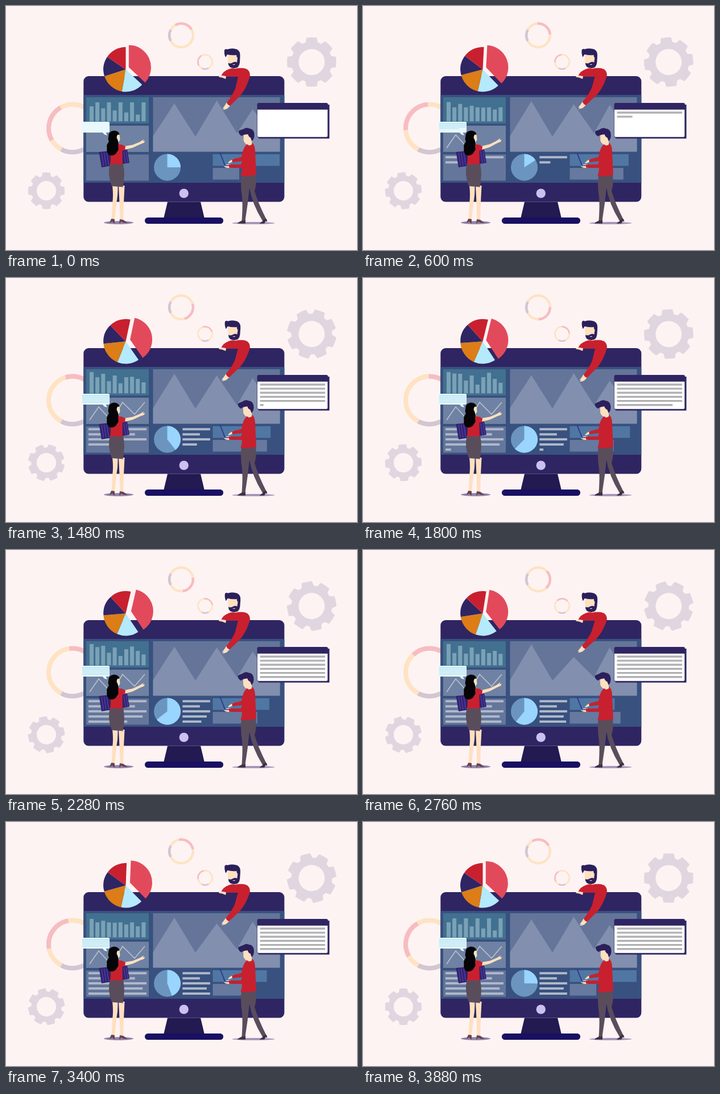
These frames come from a looping animation (617x428 px, 3920 ms). An HTML page:

```html
<!DOCTYPE html>
<html lang="en">
<head>
<meta charset="utf-8">
<title>Dashboard team</title>
<style>
html, body { margin: 0; width: 100%; height: 100%; overflow: hidden; background: #fdf3f3; }
svg { display: block; width: 617px; height: 428px; }
.navy { fill: #2f2562; }
.hair { fill: #2b205b; }
.red { fill: #c8202f; }
.skin { fill: #fee0c0; }
.slate { fill: #594d5c; }
.shoe { fill: #3c3040; }
.rule { fill: none; stroke: #b0b7c9; stroke-width: 4; }
</style>
</head>
<body>
<svg viewBox="0 0 617 428">
  <g id="rings" fill="none"></g>
  <g id="gears" fill="#e0d6e0" stroke="#e0d6e0"></g>

  <!-- monitor -->
  <rect class="navy" x="136.3" y="123" width="353" height="220.6" rx="9"/>
  <rect x="136.3" y="156" width="353" height="154" fill="#38517f"/>
  <circle cx="312.7" cy="328.6" r="8.2" fill="#cbc0ef"/>
  <path d="M284 343.6H342L349 373H277Z" fill="#221a50"/>
  <rect x="244" y="371" width="138" height="11" rx="5.5" fill="#191062"/>

  <!-- dashboard panels -->
  <rect x="141" y="160" width="110" height="46" fill="#427090"/>
  <path id="bars" fill="#7aa1b6"/>
  <rect x="141" y="210" width="110" height="46" fill="#7082a3"/>
  <path id="trend" fill="none" stroke="#b8c0d0" stroke-width="1.7"/>
  <rect x="141" y="260.5" width="110" height="46" fill="#64769b"/>
  <path id="notes" class="rule"/>
  <rect x="258.5" y="160" width="223" height="95.5" fill="#647599"/>
  <path id="peaks" fill="#828fae"/>
  <circle cx="283.5" cy="283" r="23.5" fill="#6b95be"/>
  <path id="share" fill="#99d5ff"/>
  <path id="legend" class="rule"/>
  <rect id="barA" x="363.5" y="260" height="20.5" fill="#5077a3"/>
  <rect id="barB" x="363.5" y="284" height="20.5" fill="#67799f"/>

  <!-- pop-up window -->
  <path class="navy" d="M446 173H568.5V232.5H444Z"/>
  <rect class="navy" x="441.5" y="170" width="124.5" height="61" rx="3"/>
  <path d="M442 181.8H565.3V228Q565.3 229.8 563.3 229.8H444Q442 229.8 442 228Z" fill="#fff"/>
  <path id="text" fill="none" stroke="#b1b1b3" stroke-width="3.4"/>

  <g id="pie"></g>

  <!-- man above the monitor -->
  <g id="headTop">
    <path class="skin" d="M397 100H409V113Q403 115 396 111Z"/>
    <path class="skin" d="M389 83H409V99Q408 106 400 107Q391 106 390 98Z"/>
    <path class="hair" d="M384 77Q386 74.5 389 76Q398 73 406 76Q412 79 411.5 88L411 99Q410 109 401 109Q391 109 390.5 100Q395 102 399 99Q403 97 406 99L407 91Q405 89 405 86Q396 87 389 85L386 90Q383 84 384 77Z"/>
    <path class="skin" d="M398 102.8Q401 101.5 403 102.4Q401 104 398 102.8Z"/>
  </g>
  <path class="red" d="M378 123Q382 114 391 111Q397 108 403 110Q416 107 424 111Q430 116 428.500 124H387Z"/>
  <path class="skin" d="M374 123.5Q380 120.5 387 123.5L386 128Q381 125 374 124.5Z"/>
  <g id="armTop">
    <path class="skin" d="M388 169L394 175L389 180Q385 182 381 182L384 179L380.5 180L385 174Z"/>
    <path class="red" d="M409 120Q418 110 427 116Q430 121 427 129Q421 147 411 158L394 175Q390 174 388 169.5Q398 157 403 145Z"/>
  </g>

  <!-- woman -->
  <ellipse cx="198" cy="380" rx="26" ry="2.8" fill="#9083a9"/>
  <path class="skin" d="M187 315H196.5Q197 332 194 346L191 376H185.5L187 346Q189 332 187 315ZM198 315H208.5L207 345L206 377H200.5L199.5 346Z"/>
  <path d="M185.5 373L191 374V381H189L187 378L182 380.5Q183 376 185.5 373ZM200 374L206 375L214 380.5H207L202 378L201 381H199Z" fill="#67444e"/>
  <path d="M163.5 256L213 251.5L217 275L168 283Z" fill="#2f226a"/>
  <path d="M168 257.5L171.5 280M172.5 257L176 280M177 257L180.5 279M207 255L210 275M211 254L214 274" stroke="#4d3aa0" stroke-width="1.7"/>
  <path class="slate" d="M182.5 277H206Q210 294 205.5 317.5L186 316Q178 296 182.5 277Z"/>
  <path id="armLeft" class="skin" d="M206 246.5L223 243.5L235 238.5L242.5 234L240.5 237.5L244 236.5L243 240L236 242.5L223 248.5L207 252.5Z"/>
  <path class="red" d="M183 248Q194 241 205 243.5L210 246.5L209 253L204.5 254L205 278H183Q185 264 183 248Z"/>
  <path class="skin" d="M193 225H199.5L200.5 234Q199 239 196 239V245H191Z"/>
  <path d="M180 230Q180 219 190 218.5Q199 219 199.5 226Q195 224 194.5 231Q199 238 197 247Q199 252 195 256Q192 263 183 262Q176 259 177.5 249Q176 243 181 238Q179 235 180 230Z" fill="#050407"/>

  <!-- speech bubble -->
  <path d="M133 203H180Q182 203 182 205V220Q182 222 180 222H175.5L178 227Q172 226 170 222H133Z" fill="#e8f8fd"/>
  <path id="speech" fill="none" stroke="#a6dfee" stroke-width="1.2"/>

  <!-- man with the laptop -->
  <ellipse cx="435" cy="380.8" rx="37.5" ry="2" fill="#a095b8"/>
  <path class="shoe" d="M415 375H421V381.5H407Q408 379 414 377ZM451 374L457 372.5L459 376V379L457 377L454 381.5H446Q447 379 451 378Z"/>
  <path class="slate" d="M414 295H439Q441 311 437 325Q443 345 457 373L450.5 376Q433 348 428 319Q425 348 420.5 376.5H414.5Q417 341 413.5 325Q412 310 414 295Z"/>
  <path class="skin" d="M400 267.5L398 273.5Q393 276 389.5 276L393 272ZM395 277.5V283.5Q387 285 383 281L387 278Z"/>
  <path d="M376.500 258L385 280H399" fill="none" stroke="#29308c" stroke-width="1.6"/>
  <path class="red" d="M423 243Q429 239 434 241Q438 246 438 256L439 278L440 296Q426 300 412.5 298Q415 290 415 284L392 283.5V278L413 278L415 272L398 274L397 269L414 265Q416 250 423 243Z"/>
  <g id="headRight">
    <path class="skin" d="M418 225L433 224L432 243Q427 246 425 243Q419 242 417.5 235Z"/>
    <path class="hair" d="M409 219Q413 217 417 216Q423 212 428 215Q436 216 436.5 225Q437 233 432 237L430 231Q426 229 425.5 225Q418 225 414 228Q408 224 409 219Z"/>
  </g>
</svg>
<script>
const LOOP = 3920, STEP = 40;
const $ = id => document.getElementById(id);
const put = (id, d) => $(id).setAttribute('d', d);
const spin = (id, deg, x, y) => $(id).setAttribute('transform', `rotate(${deg} ${x} ${y})`);
const ease = u => (1 - Math.cos(Math.PI * u)) / 2;
const mix = (a, b, u) => a + (b - a) * u;

const polar = (cx, cy, r, deg) => {
  const a = (deg - 90) * Math.PI / 180;
  return [cx + r * Math.cos(a), cy + r * Math.sin(a)];
};
const sector = (cx, cy, r, from, to) =>
  `M${cx} ${cy}L${polar(cx, cy, r, from)}A${r} ${r} 0 ${+(to - from > 180)} 1 ${polar(cx, cy, r, to)}Z`;

// Four eased poses, one per quarter of the loop.
function cycle(t, ...poses) {
  const q = t * 4 / LOOP, i = Math.floor(q);
  return mix(poses[i], poses[(i + 1) % 4], ease(q - i));
}

// Calls add(i, share) for each piece that a growing length has reached.
function reveal(lengths, part, add) {
  let left = part * lengths.reduce((a, b) => a + b);
  return lengths.map((len, i) => {
    const u = Math.min(1, left / len);
    left -= len;
    return u > 0 ? add(i, u) : '';
  }).join('');
}

// Rules written one after another; odd ones are shorter by `cut`.
function rules(x, y, gap, count, width, cut, part) {
  const widths = Array.from({ length: count }, (_, i) => i % 2 ? width * (1 - cut / i) : width);
  return reveal(widths, part, (i, u) => `M${x} ${y + i * gap}h${widths[i] * u}`);
}

const TREND = [[147, 249], [163, 226], [185, 250], [205, 218], [226, 239], [244, 218]];
const trendLengths = TREND.slice(1).map(([x, y], i) => Math.hypot(x - TREND[i][0], y - TREND[i][1]));

function ring(x, y, r, w, turn) {
  const arc = (color, len, deg, name) =>
    `<circle class="${name}" r="${r}" pathLength="360" stroke="${color}" stroke-dasharray="${len} 360" transform="rotate(${deg})"/>`;
  return `<g transform="translate(${x} ${y}) rotate(${turn})" stroke-width="${w}"><circle r="${r}" stroke="#fee3c3"/>` +
    arc('#f6bdc2', 90, 0, 'sweep') + arc('#d2c6d4', 56, 62, 'rest') + '</g>';
}

function gear(x, y, size) {
  let teeth = '';
  for (let a = 0; a < 360; a += 45)
    teeth += `<path d="M-11 -33L-9 -42.8Q0 -43.6 9 -42.8L11 -33Z" stroke="none" transform="rotate(${a})"/>`;
  return `<g transform="translate(${x} ${y}) scale(${size})"><g class="gear">` +
    `<circle r="29.3" fill="none" stroke-width="12.8"/>${teeth}</g></g>`;
}

$('rings').innerHTML = ring(117, 214.5, 42, 8, 0) + ring(308, 51.5, 20.8, 4.4, 90) + ring(350, 98, 12.6, 2.6, 0);
$('gears').innerHTML = gear(537.3, 98.3, 1) + gear(71, 324, .744);

const slice = (from, to, color) => `<path d="${sector(210.5, 111.2, 39.3, from, to)}" fill="${color}"/>`;
$('pie').innerHTML = slice(133, 190, '#b4eafc') + slice(190, 252, '#dc7d17') + slice(252, 304, '#2f2562') +
  slice(304, 360, '#c8202f') + `<path id="slice" d="${sector(215.7, 107.7, 39, 0, 133)}" fill="#e24a5b"/>`;

const sweeps = document.querySelectorAll('.sweep');
const gears = document.querySelectorAll('.gear');

// Odd bars sway widely, even ones only rise to a slope.
function bar(t, i) {
  const top = i % 2
    ? cycle(t, 169, 182, 178 + 13 * Math.cos(1.1 * (i - 4.3)), 182)
    : cycle(t, 176 + 1.8 * i, 165 + 1.5 * i, 165 + 1.5 * i, 165 + 1.5 * i);
  return `M${147 + i * 10.15} 202.3V${top}h7V202.3Z`;
}

function draw(t) {
  const turn = t / LOOP;
  const swing = ease(2 * turn);
  const nod = ease(4 * turn);
  const away = cycle(t, 0, 1, 1, 1);

  sweeps.forEach(el => el.setAttribute('transform', `rotate(${150 + 120 * swing})`));
  gears.forEach(el => el.setAttribute('transform', `rotate(${180 * swing})`));

  spin('pie', 14 * swing, 210.5, 111.2);
  const push = 3.8 * ease(8 * turn + .34) ** 2;
  $('slice').setAttribute('transform', `translate(${push * .8} ${push * -.6})`);

  put('bars', Array.from({ length: 10 }, (_, i) => bar(t, i)).join(''));
  const dip = 16 - 8 * Math.sin(2 * Math.PI * turn);
  put('peaks', `M258.5 255.5V228L296 ${171 - 6 * nod}L333 229L370.5 ${166 + dip * nod}` +
    `L406 223L433.5 ${181 - 11 * nod}L470 228H481.5V255.5Z`);
  put('share', sector(283.5, 283, 23.5, 0, cycle(t, 90, 41, 237, 217)));
  $('barA').setAttribute('width', cycle(t, 117.5, 96.5, 106.5, 76.5));
  $('barB').setAttribute('width', cycle(t, 46.5, 117.5, 74.5, 90.5));

  const typed = Math.sin(Math.PI / 2 * Math.min(1, t / 3000));
  put('notes', rules(145, 265.2, 8.95, 5, 102, .2, typed));
  put('legend', rules(310.3, 265.2, 8.95, 5, 48.5, .37, typed));
  put('text', rules(446.5, 187, 7.15, 6, 114.5, 0, ease(Math.min(1, t / 2000))));
  put('speech', rules(134, 206.3, 2.9, 5, 47, 0, Math.min(1, t / 800)));
  put('trend', reveal(trendLengths, Math.min(1, t / 1450), (i, u) => {
    const [x0, y0] = TREND[i], [x1, y1] = TREND[i + 1];
    return `${i ? '' : `M${x0} ${y0}`}L${mix(x0, x1, u)} ${mix(y0, y1, u)}`;
  }));

  spin('armTop', 3.4 * nod, 420, 117);
  spin('headTop', 1.6 * away, 402, 112);
  spin('headRight', -4 * away, 430, 242);
  spin('armLeft', -3.5 * ease(4 * turn + .34) ** 2, 206, 248);
}

const start = performance.now();
function tick() {
  const t = (performance.now() - start) % LOOP;
  draw(Math.floor(t / STEP) * STEP);
  requestAnimationFrame(tick);
}
tick();
</script>
</body>
</html>
```
